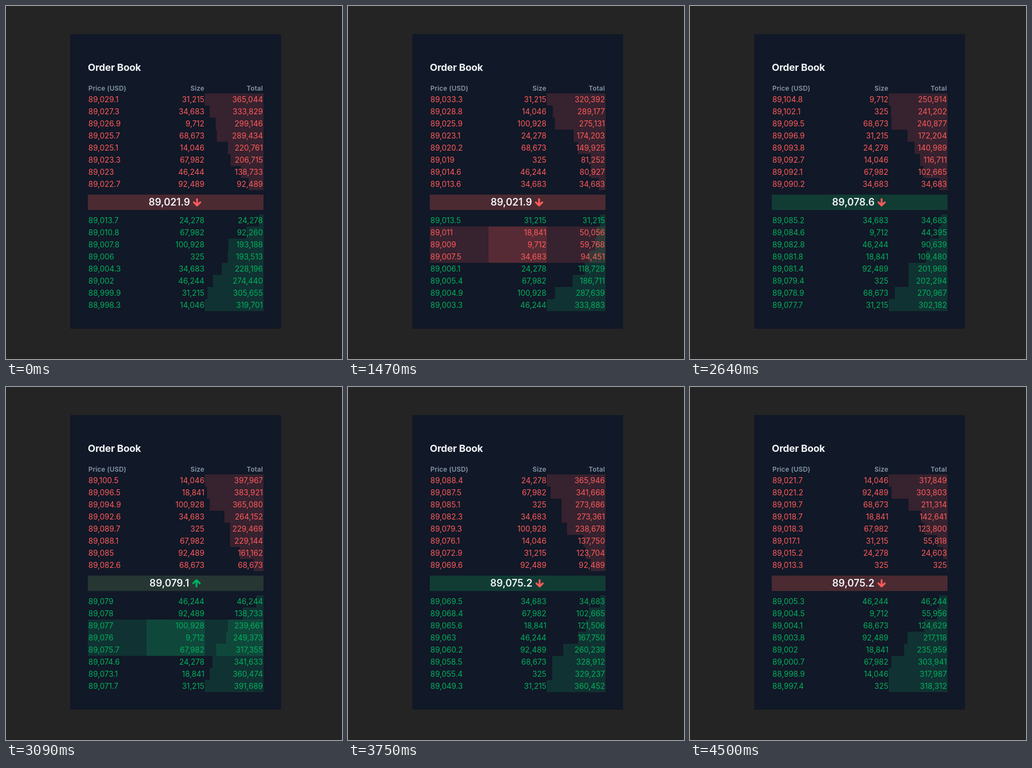
Write an HTML page that moves like this. It is 612x642 px and loops after 4530 ms.

```html
<!DOCTYPE html>
<html lang="en">
<head>
<meta charset="utf-8">
<title>Order Book</title>
<style>
  :root { --red: 255, 91, 90; --green: 16, 186, 104; }
  html, body { margin: 0; width: 100%; height: 100%; overflow: hidden; background: #242424; }
  body { position: relative; font: 14px/20px Inter, "Open Sans", sans-serif; }
  .card { position: absolute; left: 117px; top: 51px; width: 384px; height: 536px; background: #111827; }
  .card::after { content: ""; position: absolute; left: 24px; right: 23px; top: 521px; height: 1px; background: rgba(0, 0, 0, .12); }
  h1 { position: absolute; left: 32px; top: 47px; margin: 0; font-size: 18px; line-height: 28px; font-weight: 700; letter-spacing: -.2px; color: #f0f4f8; }
  .row { position: relative; display: grid; grid-template-columns: repeat(3, 1fr); height: 22px; }
  .row > * { position: relative; padding: 1px; text-align: right; white-space: nowrap; }
  .row > :first-child { text-align: left; }
  .head, .side, .last { position: absolute; left: 32px; width: 320px; }
  .head { top: 88px; font-size: 12px; font-weight: 600; letter-spacing: .2px; color: #8698aa; }
  .asks { top: 108px; color: rgb(var(--red)); --bar: var(--red); }
  .bids { top: 328px; color: #00b15d; --bar: var(--green); }
  .bar { position: absolute; right: 0; top: 0; height: 100%; background: rgba(var(--bar), .16); }
  .total { position: relative; }
  .up, .up .size { background: rgba(var(--green), .16); }
  .up .size { color: #00b15d; }
  .down, .down .size { background: rgba(var(--red), .16); }
  .down { color: rgb(var(--red)); }
  .last { top: 292px; height: 28px; display: flex; align-items: center; justify-content: center; gap: 3px;
    font-size: 18px; font-weight: 600; color: #f0f4f8; }
  .last svg { width: 20px; height: 20px; fill: none; stroke-width: 4; stroke-linecap: round; stroke-linejoin: round; }
</style>
</head>
<body>
<main class="card">
  <h1>Order Book</h1>
  <div class="row head"><span>Price (USD)</span><span>Size</span><span>Total</span></div>
  <div class="side asks"></div>
  <div class="last"><span></span><svg viewBox="0 0 24 24"><path d="M12 5v14M19 12l-7 7-7-7"/></svg></div>
  <div class="side bids"></div>
</main>
<script>
const LOOP = 4530, TICK = 30, ROWS = 8, BASE = 89000;
const $ = q => document.querySelector(q);
const lerp = (a, b, p) => a + (b - a) * p;
const lastAt = (list, t) => list.findLast(e => e.t <= t);
const flash = (where, from, count, dir) => ({ where, from, count, dir });

// Key points: [lowest, highest] price of each side, above BASE
const keys = [
  { t: 0, asks: [22.7, 29.1], bids: [-1.7, 13.7] },
  { t: 780, asks: [13.4, 22.6], bids: [-11.2, 13.2] },
  { t: 1470, asks: [13.6, 33.3], bids: [3.3, 13.5], flash: flash('bids', 1, 3, 'down') },
  { t: 2280, asks: [99, 110.9], bids: [85.2, 92.8], flash: flash('asks', 0, 7, 'up') },
  { t: 3090, asks: [82.6, 100.5], bids: [71.7, 79], flash: flash('bids', 2, 3, 'up') },
  { t: 3750, asks: [69.6, 88.4], bids: [49.3, 69.5] },
  { t: 4500, asks: [13.3, 21.7], bids: [-2.6, 5.3] }
];

// Orders of these sizes keep returning to the book
const lots = [34683, 92489, 68673, 14046, 24278, 31215, 46244, 325, 100928, 67982, 9712, 18841];

const trades = [
  { t: 0, price: 21.9, dir: 'down' },
  { t: 1860, price: 89.9, dir: 'up' },
  { t: 2640, price: 78.6, dir: 'down' },
  { t: 3060, price: 79.1, dir: 'up' },
  { t: 3750, price: 75.2, dir: 'down' }
];

// Updates come in bursts of 15 with a short rest after each
const steps = keys.map(k => k.t);
for (let start = 30; start < LOOP - TICK; start += 562)
  for (let k = 0; k < 15; k++)
    steps.push(Math.round((start + k * 36) / TICK) * TICK);
steps.sort((a, b) => a - b);

function seeded(seed) {
  let s = seed * 2654435761 >>> 0;
  return () => {
    s = s + 0x6D2B79F5 >>> 0;
    let x = Math.imul(s ^ s >>> 15, s | 1);
    x ^= x + Math.imul(x ^ x >>> 7, x | 61);
    return ((x ^ x >>> 14) >>> 0) / 4294967296;
  };
}

// Eight falling prices from high to low, unevenly spaced
function ladder(low, high, rnd) {
  const gaps = Array.from({ length: ROWS - 1 }, () => .15 + rnd());
  const sum = gaps.reduce((a, b) => a + b);
  let price = high;
  return [high, ...gaps.map(g => price -= g / sum * (high - low))];
}

function pickLots(rnd) {
  const pool = [...lots];
  return Array.from({ length: ROWS }, () => pool.splice(Math.floor(rnd() * pool.length), 1)[0]);
}

function randomFlash(rnd) {
  if (rnd() > .43) return null;
  return flash(rnd() < .5 ? 'asks' : 'bids', Math.floor(rnd() * 5), 1 + Math.floor(rnd() * 3), rnd() < .5 ? 'up' : 'down');
}

function bookAt(t) {
  const rnd = seeded(t + 7);
  const a = lastAt(keys, t), b = keys[keys.indexOf(a) + 1] || a;
  const p = (t - a.t) / (b.t - a.t || 1);
  const shift = p ? (rnd() - .5) * 5 : 0;
  const side = name => {
    const [low, high] = a[name].map((v, i) => lerp(v, b[name][i], p) + shift);
    return { prices: ladder(low, high, rnd), sizes: pickLots(rnd) };
  };
  return { asks: side('asks'), bids: side('bids'), flash: p ? randomFlash(rnd) : a.flash };
}

const fmt = n => n.toLocaleString('en-US', { maximumFractionDigits: 1 });
const sum = list => list.reduce((a, b) => a + b, 0);

function makeRows(name) {
  return Array.from({ length: ROWS }, () => {
    const el = document.createElement('div');
    el.innerHTML = '<span></span><span class="size"></span><span><i class="bar"></i><span class="total"></span></span>';
    $('.' + name).append(el);
    return { el, price: el.firstChild, size: el.children[1], bar: el.querySelector('.bar'), total: el.querySelector('.total') };
  });
}
const rows = { asks: makeRows('asks'), bids: makeRows('bids') };

function drawSide(name, book) {
  const { prices, sizes } = book[name], f = book.flash;
  rows[name].forEach((r, i) => {
    const total = sum(name === 'asks' ? sizes.slice(i) : sizes.slice(0, i + 1));
    const lit = f && f.where === name && i >= f.from && i < f.from + f.count;
    r.el.className = 'row' + (lit ? ' ' + f.dir : '');
    r.price.textContent = fmt(BASE + prices[i]);
    r.size.textContent = fmt(sizes[i]);
    r.total.textContent = fmt(total);
    r.bar.style.width = total / sum(sizes) * 100 + '%';
  });
}

const tint = { up: [17, 60, 52], down: [75, 42, 50] };
const lastBox = $('.last'), lastText = $('.last span'), arrow = $('.last svg');

function drawLast(t) {
  const cur = lastAt(trades, t);
  const prev = trades[trades.indexOf(cur) - 1] || cur;
  const k = 1 - (1 - Math.min(1, (t - cur.t) / 90)) ** 2.6;
  const color = tint[prev.dir].map((v, i) => Math.round(lerp(v, tint[cur.dir][i], k)));
  const up = cur.dir === 'up';
  lastBox.style.background = `rgb(${color})`;
  lastText.textContent = fmt(BASE + cur.price);
  arrow.style.stroke = up ? '#00b15d' : '#ff5b5a';
  arrow.style.transform = up ? 'scaleY(-1)' : 'none';
}

let shown = -1;
function frame(now) {
  const t = Math.floor(now % LOOP / TICK) * TICK;
  const step = steps.findLast(s => s <= t);
  if (step !== shown) {
    const book = bookAt(step);
    drawSide('asks', book);
    drawSide('bids', book);
    shown = step;
  }
  drawLast(t);
  requestAnimationFrame(frame);
}
frame(0);
</script>
</body>
</html>
```
